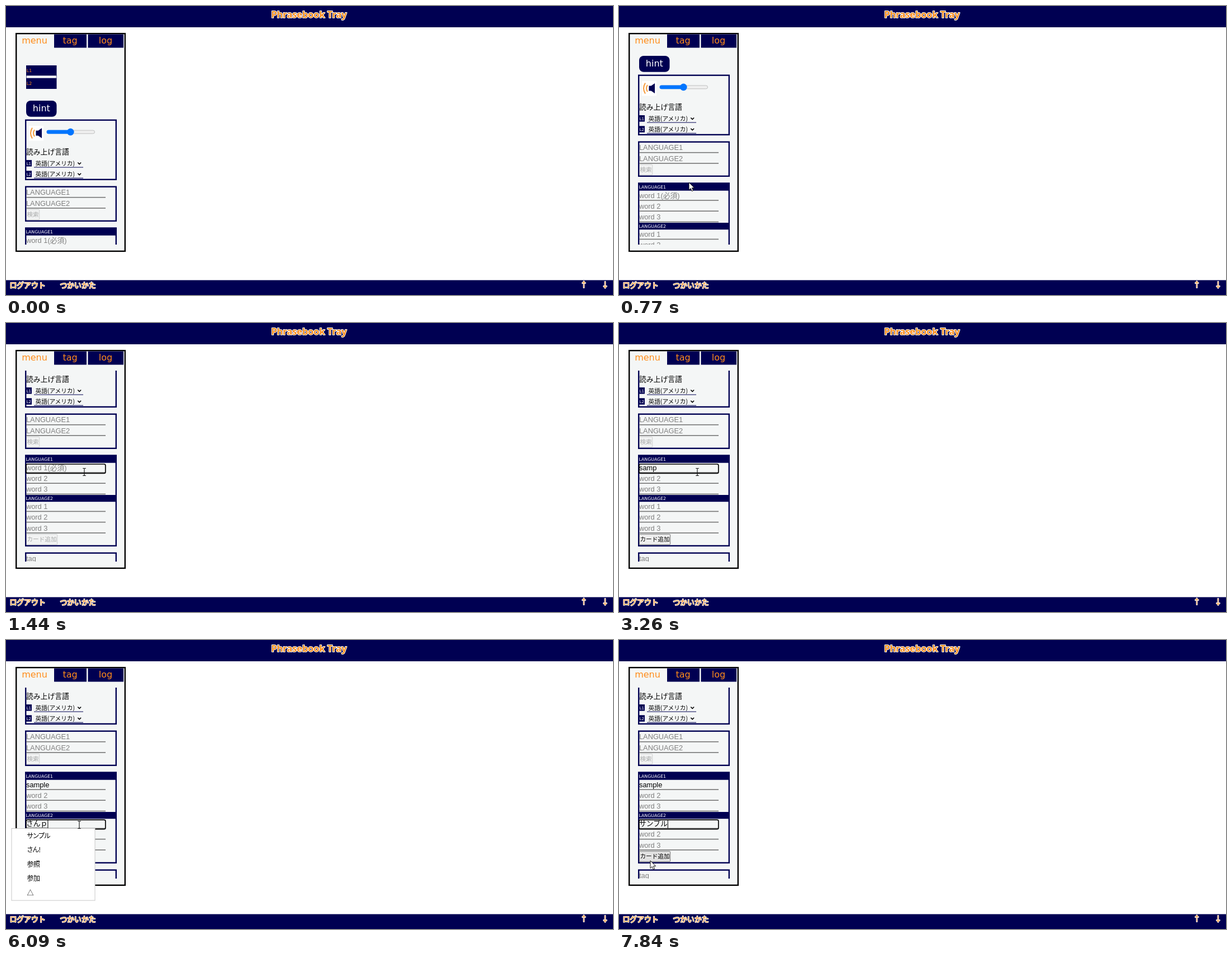
Recreate the animation shown at these times as an HTML page. Size 1085 px wide and 516 px high, loop 8000 ms.

```html
<!DOCTYPE html>
<html lang="ja">
<head>
<meta charset="utf-8">
<title>Phrasebook Tray</title>
<style>
html, body { margin: 0; width: 100%; height: 100%; overflow: hidden; background: #fff; }
svg { display: block; width: 100%; height: 100%; }
text { white-space: pre; }
.ui { font-family: "DejaVu Sans", sans-serif; }
.jp { font-family: "Noto Sans CJK JP", "Noto Sans CJK", sans-serif; }
.field { font: 12.8px "Liberation Sans", "Noto Sans CJK JP", "Noto Sans CJK", sans-serif; }
.navy { fill: #000052; }
.orange { fill: #ff8c1a; }
.outlined { fill: #ff8c1a; stroke: #fff; stroke-width: 2px; paint-order: stroke; stroke-linejoin: round; }
.title { font: bold 16.3px "Noto Sans", sans-serif; }
.frame { fill: none; stroke: #000052; stroke-width: 2.4; }
.mid { text-anchor: middle; }
.big { font-size: 16px; }
.small { font-size: 7.8px; }
.hintText { fill: #808080; }
.off { opacity: .3; }
.candidates { font-size: 12px; letter-spacing: -.6px; font-feature-settings: "palt"; }
</style>
</head>
<body>
<svg viewBox="0 0 1085 516">
  <defs><clipPath id="view"><rect x="19" y="85" width="192" height="341"/></clipPath></defs>
  <rect class="navy" width="1085" height="38"/>
  <text class="outlined title mid" x="541.5" y="21">Phrasebook Tray</text>
  <rect class="navy" y="489.5" width="1085" height="26.5"/>
  <g class="outlined jp" font-size="12.8">
    <text x="6.5" y="503">ログアウト</text>
    <text x="96.5" y="503">つかいかた</text>
    <text class="mid" x="1033" y="501.5">↑</text>
    <text class="mid" x="1071" y="501.5">↓</text>
  </g>

  <rect x="18.2" y="49.2" width="194.6" height="388.6" fill="#f4f6f6" stroke="#000" stroke-width="2.4"/>
  <rect class="navy" x="86" y="50.5" width="58" height="24"/>
  <rect class="navy" x="146.5" y="50.5" width="63.5" height="24"/>
  <g class="ui orange big mid">
    <text x="51" y="67.3">menu</text>
    <text x="114.5" y="67.3">tag</text>
    <text x="178" y="67.3">log</text>
  </g>

  <g clip-path="url(#view)"><g id="content"></g></g>
  <g id="popup" display="none">
    <rect id="popupBox" x="10" y="336.5" width="149" height="128.5" fill="#fff" stroke="#c8c8c8"/>
    <g id="candidates" class="jp candidates"></g>
  </g>
  <path id="arrow" d="M0 0V13.5L3.2 10.6L5.3 15.6L7.6 14.6L5.5 9.8H9.6Z" fill="#fff" stroke="#000" stroke-width=".9"/>
  <path id="beam" d="M-2.8 -6.5H-.8L0 -5.8L.8 -6.5H2.8M0 -5.8V5.8M-2.8 6.5H-.8L0 5.8L.8 6.5H2.8" fill="none" stroke="#111" stroke-width="1.1"/>
</svg>
<script>
const LOOP = 8000, TICK = 1000 / 15;
const el = id => document.getElementById(id);

const box = (y, h) => `<rect class="frame" x="35.2" y="${y + 1.2}" width="161.6" height="${h - 2.4}"/>`;
const header = (y, h, label) =>
  `<rect class="navy" x="34" y="${y}" width="164" height="${h}"/>
   <text class="ui small" x="35.5" y="${y + h - 3.6}" fill="#fff">${label}</text>`;
const field = (y, label, id = '') =>
  `<rect x="36" y="${y - .8}" width="142" height="1.6" fill="#767676"/>
   <text class="field hintText" x="36" y="${y - 4.3}" ${id && `id="${id}"`}>${label}</text>`;
const button = (y, w, label, id) =>
  `<g id="${id}" class="off"><rect x="36.4" y="${y}" width="${w}" height="18.6" rx="1.6" fill="#efefef" stroke="#666" stroke-width=".9"/>
   <text class="jp" font-size="10.67" x="37.4" y="${y + 13.2}">${label}</text></g>`;
const voice = (y, label) =>
  `<rect class="navy" x="35.5" y="${y - 5.5}" width="10.5" height="11.5"/>
   <text class="ui mid" font-size="7" fill="#fff" x="40.8" y="${y + 3}">${label}</text>
   <text class="jp" font-size="10.67" x="52.5" y="${y + 4}">英語(アメリカ)</text>
   <path d="M128.3 ${y - 1}l2.9 2.9l2.9 -2.9" fill="none" stroke="#000" stroke-width="1.6"/>
   <rect class="navy" x="50" y="${y + 7}" width="88" height="1"/>`;
const ring = id =>
  `<g id="${id}" display="none"><rect x="35.8" y="0" width="142" height="16.4" rx="2.4" fill="none" stroke="#000" stroke-width="1.7"/></g>`;

el('content').innerHTML = `
  <rect class="navy" x="36" y="106" width="54.5" height="18.6"/>
  <rect class="navy" x="36" y="129" width="54.5" height="19"/>
  <rect x="36.4" y="124" width="53.7" height="5" fill="#f4f6f6" stroke="#000052" stroke-width=".6"/>
  <g class="ui orange small"><text x="36.8" y="118">L1</text><text x="36.8" y="141">L2</text></g>
  <rect class="navy" x="36" y="169" width="54.5" height="28.8" rx="8"/>
  <text class="ui big mid" x="63.3" y="188" fill="#fff">hint</text>

  ${box(202.5, 108.5)}
  <rect x="41" y="214" width="26" height="26.5" fill="#fff"/>
  <path d="M47 217.5q-6 9.5 0 19M51 221q-4 6 0 12" fill="none" stroke="#f59a3c" stroke-width="2"/>
  <path class="navy" d="M53.5 222.5H57.5L64 218V236L57.5 231.5H53.5Z"/>
  <rect x="73" y="222" width="85.5" height="5.8" rx="2.9" fill="#efefef" stroke="#b2b2b2" stroke-width=".8"/>
  <rect x="72.6" y="221.6" width="42" height="6.6" rx="3.3" fill="#0075ff"/>
  <circle cx="115.3" cy="224.9" r="6.3" fill="#0075ff"/>
  <text class="jp" font-size="12.8" x="36" y="264.8">読み上げ言語</text>
  ${voice(280.5, 'L1')}${voice(299.7, 'L2')}

  ${box(321.5, 63.5)}
  ${field(341.7, 'LANGUAGE1')}${field(360.9, 'LANGUAGE2')}
  ${button(363.2, 23.3, '検索', 'search')}

  ${box(395.5, 163.5)}
  ${header(395.5, 14.2, 'LANGUAGE1')}
  ${field(427, 'word 1(必須)', 'word1')}${field(446.2, 'word 2')}${field(465.4, 'word 3')}
  ${header(467, 12.2, 'LANGUAGE2')}
  ${field(496.4, 'word 1', 'word2')}${field(515.6, 'word 2')}${field(534.8, 'word 3')}
  ${button(537.2, 55.3, 'カード追加', 'add')}
  <g transform="translate(0 412)">${ring('ring1')}</g>
  <g transform="translate(0 481.2)">${ring('ring2')}</g>
  <path id="composing" fill="none" stroke="#333" stroke-width="1" stroke-dasharray="1.5 1"/>
  <rect id="caret" width="1" height="14" y="0"/>

  ${box(569.5, 60)}
  ${field(589.2, 'tag')}`;

// [time, value...] keys; hold() jumps, glide() eases between them
const hold = (keys, t) => keys.reduce((now, key) => key[0] <= t ? key : now, keys[0])[1];
function glide(keys, t) {
  const i = keys.findIndex(key => key[0] > t);
  if (i <= 0) return keys[i ? keys.length - 1 : 0].slice(1);
  const a = keys[i - 1], b = keys[i];
  const p = (t - a[0]) / (b[0] - a[0]), e = p * p * (3 - 2 * p);
  return a.slice(1).map((v, n) => v + (b[n + 1] - v) * e);
}

const scroll = [[340, 0], [630, 80], [960, 80], [1230, 160]];
const pointer = [[60, 196, 300], [420, 126, 316], [630, 125, 315], [760, 125, 315], [770, 124, 315],
  [1180, 124, 315], [1390, 140, 266], [4420, 140, 266], [4600, 146, 292], [4800, 131, 329],
  [5070, 131, 330], [7250, 131, 330], [7780, 56, 394]];
const typed1 = [[0, ''], [2180, 's'], [2380, 'sa'], [2440, 'sam'], [2710, 'samp'], [3530, 'sampl'], [3600, 'sample']];
const typed2 = [[0, ''], [5750, 'ｓ'], [5820, 'さ'], [5950, 'さｎ'], [6020, 'さん'], [6090, 'さんｐ'],
  [6150, 'さんぷ'], [6290, 'さんぷｒ'], [6360, 'さんぷる'], [6500, 'サンプル']];
const caretOn = [[0, false], [2180, true], [3260, false], [3530, true], [4130, false], [4600, true],
  [4940, false], [5750, true]];
const lists = [[0, ''], [5890, 'さん さらに 3 様 際'], [6020, 'さん 3 三 参加 山'], [6090, 'サンプル さん! 参照 参加 △'],
  [6360, 'サンプル サンプルを サンプルの サンプルは サンプル数'], [6890, '']];

const show = (node, on) => node.setAttribute('display', on ? 'inline' : 'none');
const place = (node, x, y) => node.setAttribute('transform', `translate(${x} ${y})`);

function setField(node, value, placeholder) {
  const text = value || placeholder;
  if (node.textContent !== text) node.textContent = text;
  node.style.fill = value ? '#000' : '';
}

let shownList = '';
function setPopup(list) {
  if (list === shownList) return;
  shownList = list;
  show(el('popup'), list);
  el('popupBox').setAttribute('width', list.length > 20 ? 156 : 149);
  el('candidates').innerHTML = list.split(' ')
    .map((word, i) => `<text x="37.5" y="${353.6 + i * 25.6}">${word}</text>`).join('');
}

function draw(t) {
  const step = Math.floor((t + 5) / TICK) * TICK;
  const [offset] = glide(scroll, step);
  place(el('content'), 0, -offset);

  const first = hold(typed1, t), second = hold(typed2, t);
  setField(el('word1'), first, 'word 1(必須)');
  setField(el('word2'), second, 'word 1');
  show(el('ring1'), t >= 1440 && t < 4940);
  show(el('ring2'), t >= 4940);

  const inSecond = t >= 4940;
  const active = el(inSecond ? 'word2' : 'word1');
  const end = 36 + ((inSecond ? second : first) ? active.getComputedTextLength() : 0);
  show(el('caret'), hold(caretOn, t));
  place(el('caret'), end, inSecond ? 482 : 412.6);
  const composing = t >= 5750 && t < 6890;
  show(el('composing'), composing);
  if (composing) el('composing').setAttribute('d', `M37 495H${end - 1}`);
  setPopup(hold(lists, t));

  const [x, y] = glide(pointer, step);
  const row = y + offset;
  const overField = x > 36 && x < 178 && (row > 410 && row < 466 || row > 480 && row < 536);
  const visible = t >= 70;
  show(el('arrow'), visible && !overField);
  show(el('beam'), visible && overField);
  place(el('arrow'), x, y);
  place(el('beam'), x, y);

  const add = el('add');
  add.setAttribute('class', first ? '' : 'off');
  const hovered = x > 36 && x < 92 && row > 537 && row < 556;
  add.firstElementChild.setAttribute('fill', hovered ? '#e2e2e2' : '#efefef');
}

const start = performance.now();
function tick() {
  draw((performance.now() - start) % LOOP);
  requestAnimationFrame(tick);
}
tick();
</script>
</body>
</html>
```
